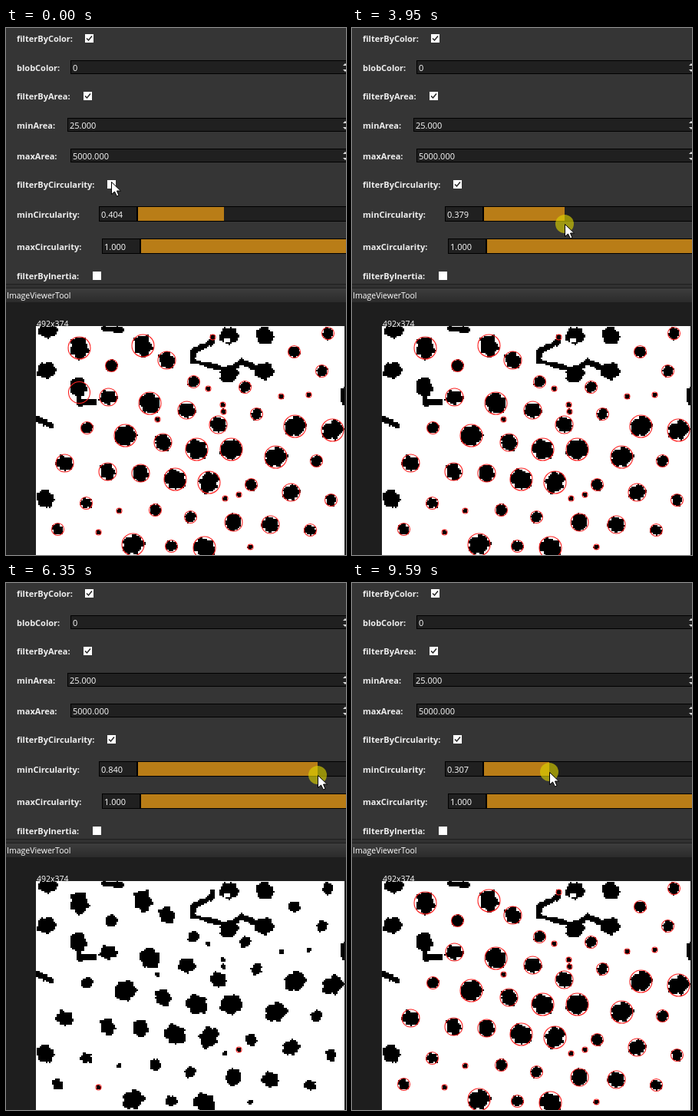
An HTML page with a canvas for the animation above (9.97 s loop, 443 by 686 pixels).

```html
<!DOCTYPE html>
<html>
<head>
<meta charset="utf-8">
<style>
html, body { margin: 0; width: 443px; height: 686px; overflow: hidden; background: #1e1e1e; }
canvas { display: block; }
</style>
</head>
<body>
<canvas id="stage" width="443" height="686"></canvas>
<script>
const W = 443, H = 686, LOOP = 9970, STEP = 77.15;
const ctx = document.getElementById('stage').getContext('2d');
const lerp = (a, b, p) => a + (b - a) * p;

// Blobs by size, from ragged to round; circularity rises evenly from lo to hi.
const sizes = [
  { r: 14.5, lo: .43, hi: .68, at: [[264, 591], [178, 413], [425, 523], [165, 672], [258, 676], [95, 416],
    [220, 587], [248, 548], [351, 558], [376, 518], [187, 488], [155, 530], [293, 548]] },
  { r: 11.5, lo: .415, hi: .68, at: [[133, 480], [76, 566], [132, 577], [235, 497], [276, 516], [344, 646],
    [371, 604], [209, 432], [204, 539], [296, 643], [175, 579]] },
  { r: 8, lo: .43, hi: .766, at: [[240, 636], [67, 652], [396, 653], [411, 446], [104, 618], [423, 614],
    [311, 467], [326, 502], [419, 397], [375, 421], [404, 563], [215, 674], [319, 594], [105, 520],
    [194, 627], [244, 460], [137, 439]] },
  { r: 3.5, lo: .642, hi: .862, at: [[318, 675], [147, 628], [394, 477], [282, 490], [263, 469], [285, 612],
    [283, 499], [358, 479], [269, 402], [197, 509], [303, 607], [120, 656]] }];
const blobs = sizes.flatMap(({ r, lo, hi, at }) =>
  at.map(([x, y], i) => ({ x, y, r, c: lerp(lo, hi, i / (at.length - 1)) })));
const rings = [...blobs, { x: 95, y: 474, r: 14, c: .26 }];

// Shapes that never get a ring
const loose = [[54, 392], [337, 400], [290, 400], [52, 445], [51, 612], [94, 467], [336, 446], [290, 450]];
const strands = [
  [[268, 408], [244, 420], [242, 433], [272, 440], [290, 446], [306, 434], [334, 446]],
  [[94, 474], [95, 488], [114, 486]],
  [[40, 508], [58, 517]],
  [[128, 391], [149, 392]],
  [[440, 471], [440, 488]]];

// Slider drag: step, value, pointer height
const drag = [
  [10, .404, 243], [19, .365, 243], [27, .222, 244], [33, .222, 247], [37, .198, 249], [41, .198, 250],
  [48, .379, 255], [54, .56, 253], [56, .56, 253], [65, .74, 251], [74, .797, 251], [82, .866, 250],
  [90, .866, 250], [94, .744, 249], [96, .744, 249], [109, .448, 253], [121, .307, 246]];

function dragAt(k) {
  const i = drag.findIndex(d => d[0] > k);
  if (i < 0) return drag[drag.length - 1].slice(1);
  const [k0, v0, y0] = drag[Math.max(0, i - 1)], [k1, v1, y1] = drag[i];
  const p = Math.max(0, (k - k0) / (k1 - k0));
  return [lerp(v0, v1, p), lerp(y0, y1, p)];
}

const barEnd = value => Math.round(172 + 278 * value);

function rect(g, color, x, y, w, h) {
  g.fillStyle = color;
  g.fillRect(x, y, w, h);
}

function text(g, s, x, y, style = '11px', color = '#fff') {
  g.font = style + ' "Open Sans", "Noto Sans", sans-serif';
  g.fillStyle = color;
  g.fillText(s, x, y);
}

// A disc of square cells; the lower the circularity, the deeper its dents.
function blob(g, x, y, r, c) {
  const seed = x * 1.7 + y * .9;
  const snap = (v, o) => o + 2 * Math.floor((v - r - 2 - o) / 2);
  g.fillStyle = '#000';
  for (let cy = snap(y, 389); cy < y + r + 3; cy += 2) {
    for (let cx = snap(x, 40); cx < x + r + 3; cx += 2) {
      const dx = cx + .5 - x, dy = cy + .5 - y, q = Math.atan2(dy, dx);
      const dent = .22 + .2 * Math.sin(2 * q + seed) + .2 * Math.sin(5 * q + seed * 2) + .12 * Math.sin(9 * q + seed);
      if (Math.hypot(dx, dy) < r * (1 - (1 - c) * dent)) g.fillRect(cx, cy, 2, 2);
    }
  }
}

function strand(g, points) {
  for (let i = 1; i < points.length; i++) {
    const [x, y] = points[i - 1], [u, v] = points[i];
    const n = Math.ceil(Math.hypot(u - x, v - y) / 3);
    for (let k = 0; k <= n; k++) {
      const px = lerp(x, u, k / n), py = lerp(y, v, k / n);
      blob(g, px, py, 2.4 + 2.2 * Math.abs(Math.sin(px * 12.9 + py * 78.2)), .8);
    }
  }
}

function checkbox(g, x, y, on) {
  rect(g, '#fff', x, y, 11, 11);
  if (!on) return;
  g.strokeStyle = '#222';
  g.lineWidth = 1.5;
  g.beginPath();
  g.moveTo(x + 2, y + 5.5);
  g.lineTo(x + 4.5, y + 8);
  g.lineTo(x + 9, y + 2.5);
  g.stroke();
}

function field(g, x, y, w, h) {
  rect(g, '#000', x, y, w, h);
  rect(g, '#202020', x + 1, y + 1, w - 2, h - 2);
}

function spinner(g, x, y, value) {
  field(g, x, y, 450 - x, 18);
  text(g, value, x + 3, y + 14);
  g.fillStyle = '#ddd';
  for (const [ty, d] of [[y + 7, -3], [y + 12, 3]]) {
    g.beginPath();
    g.moveTo(439, ty);
    g.lineTo(445, ty);
    g.lineTo(442, ty + d);
    g.fill();
  }
}

function slider(g, x, y, value, end) {
  field(g, x, y, 50, 20);
  field(g, x + 49, y, 450 - x, 20);
  rect(g, '#000', x + 49, y, 2, 20);
  rect(g, '#b97d17', x + 51, y + 1, end - x - 51, 18);
  text(g, value.toFixed(3), x + 3, y + 15);
}

function clipToImage(g, paint) {
  g.save();
  g.beginPath();
  g.rect(39, 388, 402, 298);
  g.clip();
  paint();
  g.restore();
}

function makeBackground() {
  const c = document.createElement('canvas');
  c.width = W;
  c.height = H;
  const g = c.getContext('2d');
  rect(g, '#353535', 0, 0, W, 333);
  rect(g, '#1e1e1e', 0, 333, W, H - 333);
  rect(g, '#303030', 0, 334, W, 4);
  const shade = g.createLinearGradient(0, 339, 0, 357);
  shade.addColorStop(0, '#3d3d3d');
  shade.addColorStop(1, '#2b2b2b');
  rect(g, shade, 0, 339, W, 18);
  text(g, 'ImageViewerTool', 1, 352, '10.5px');

  const labels = { filterByColor: 18, blobColor: 56, filterByArea: 93, minArea: 131, maxArea: 171,
    filterByCircularity: 208, minCircularity: 247, maxCircularity: 289, filterByInertia: 327 };
  for (const name in labels) text(g, name + ':', 14, labels[name], 'bold 11px', '#eee');
  checkbox(g, 103, 8, true);
  checkbox(g, 101, 83, true);
  checkbox(g, 113, 317, false);
  spinner(g, 84, 42, '0');
  spinner(g, 80, 117, '25.000');
  spinner(g, 84, 157, '5000.000');
  slider(g, 125, 274, 1, W);

  clipToImage(g, () => {
    rect(g, '#fff', 39, 388, 402, 298);
    for (const b of blobs) blob(g, b.x, b.y, b.r, b.c);
    for (const [x, y] of loose) blob(g, x, y, 12.5, .65);
    strands.forEach(s => strand(g, s));
    rect(g, '#fff', 284, 404, 8, 5);
  });
  text(g, '492x374', 40, 389, '10.5px');
  return c;
}

function cursor(x, y, pressed) {
  if (pressed) {
    ctx.fillStyle = 'rgba(220,210,0,.63)';
    ctx.beginPath();
    ctx.arc(x, y, 12, 0, 7);
    ctx.fill();
  }
  ctx.save();
  ctx.translate(x + .5, y + .5);
  ctx.beginPath();
  for (const [px, py] of [[0, 0], [0, 16], [4, 12.5], [7, 18.5], [9.5, 17.5], [7, 11.5], [12, 11.5]]) ctx.lineTo(px, py);
  ctx.closePath();
  ctx.fillStyle = '#fff';
  ctx.fill();
  ctx.strokeStyle = '#000';
  ctx.lineWidth = 1;
  ctx.stroke();
  ctx.restore();
}

const background = makeBackground();

function draw() {
  const k = Math.floor((performance.now() % LOOP - 250) / STEP + .2);
  const [value, dragY] = dragAt(k), checked = k >= 1;
  ctx.drawImage(background, 0, 0);
  checkbox(ctx, 132, 198, checked);
  slider(ctx, 121, 232, value, barEnd(value));

  clipToImage(ctx, () => {
    ctx.strokeStyle = '#f22';
    ctx.lineWidth = 1.1;
    for (const { x, y, r, c } of rings) {
      if (checked && value >= c) continue;
      ctx.beginPath();
      ctx.arc(x + .5, y + .5, r, 0, 7);
      ctx.stroke();
    }
  });

  // From the checkbox to the slider, then along with the value
  const p = Math.min(1, Math.max(0, (k - 1) / 7)), dragging = k >= 10;
  const x = dragging ? barEnd(value) : lerp(137, 262, p);
  const y = dragging ? dragY : lerp(200, 239, p);
  cursor(Math.round(x), Math.round(y), k >= 0 && k < 2 || dragging && k < 29 || k >= 33);
  requestAnimationFrame(draw);
}
draw();
</script>
</body>
</html>
```
